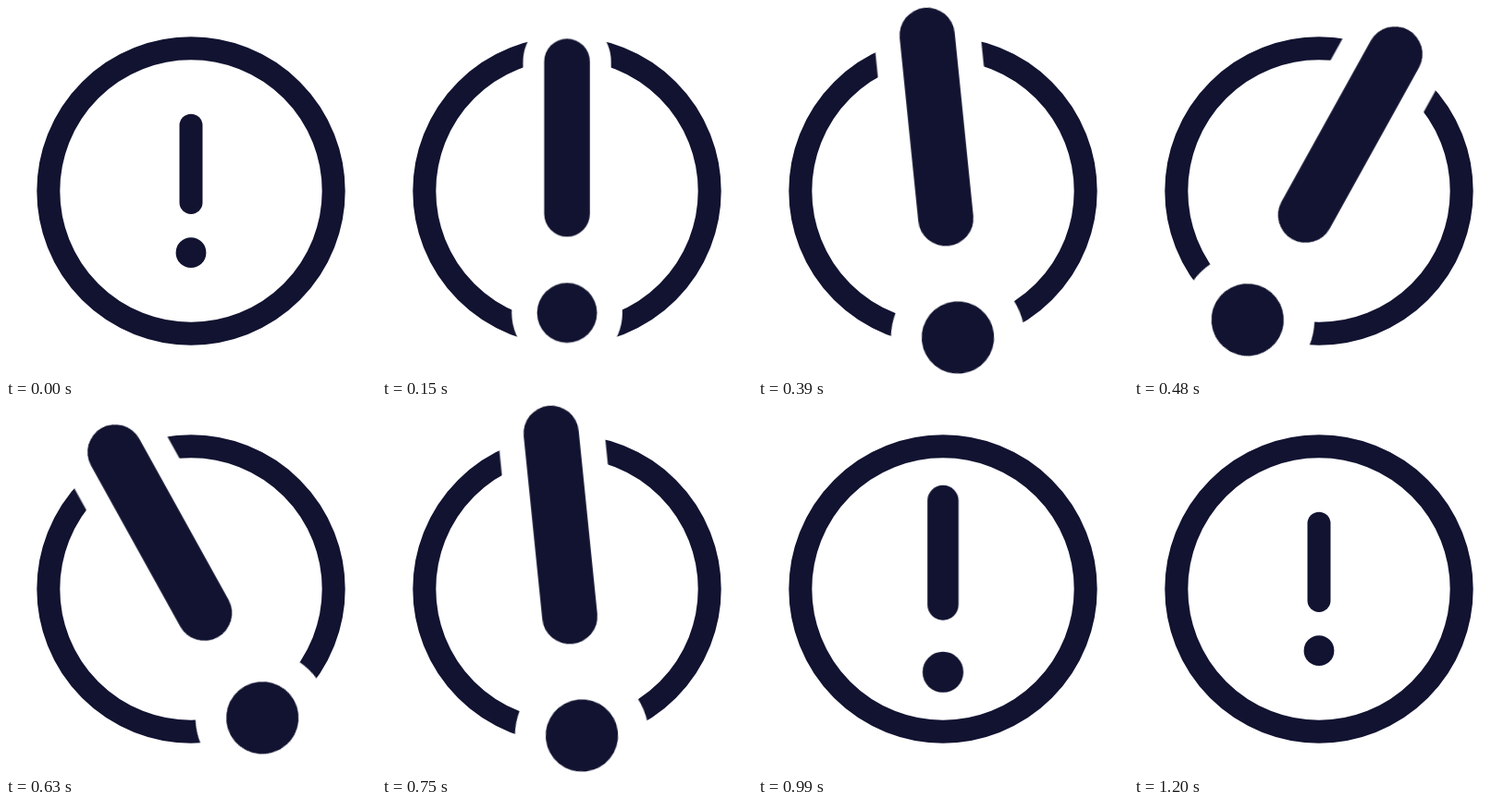
Recreate the animation shown at these times as an HTML page without scripts. Size 400 by 400 pixels, loop 3.23 s.

```html
<!DOCTYPE html>
<html lang="en">
<head>
<meta charset="utf-8">
<title>Alert icon</title>
<style>
  @property --grow { syntax: "<number>"; inherits: false; initial-value: 1; }
  @property --size { syntax: "<number>"; inherits: false; initial-value: 1; }

  html, body { margin: 0; width: 100%; height: 100%; overflow: hidden; background: #fff; }
  svg { display: block; width: 100vw; height: 100vh; }

  .ring { fill: none; stroke: #121331; stroke-width: 25; }
  .bar { stroke: #121331; stroke-width: 25; stroke-linecap: round; }
  .dot { fill: #121331; }
  .halo .bar { stroke: #fff; stroke-width: 48.2; }
  .halo .dot { fill: #fff; }

  /* --grow: what is left of the zoom in; --size: what is left of the zoom out */
  .mark {
    transform-origin: 0 0;
    transform: scale(calc(1 + 1.388 * (1 - var(--grow) * var(--grow)) * var(--size) * var(--size)));
    animation: grow 3230ms -2ms infinite, shrink 3230ms -2ms infinite;
  }
  .swing { transform-origin: 0 0; animation: swing 3230ms -2ms infinite; }

  @keyframes grow {
    0% { --grow: 1; animation-timing-function: steps(11); }
    10.2167%, 100% { --grow: 0; }
  }
  @keyframes shrink {
    0% { --size: 1; }
    24.1486% { --size: 1; animation-timing-function: steps(14); }
    37.1517%, 100% { --size: 0; }
  }
  @keyframes swing {
    0% { transform: rotate(0deg); }
    8.3591% { transform: rotate(0deg); animation-timing-function: steps(2); }
    10.2167% { transform: rotate(-29deg); animation-timing-function: steps(5); }
    14.8607% { transform: rotate(29deg); animation-timing-function: steps(5); }
    19.5046% { transform: rotate(-29deg); animation-timing-function: steps(5); }
    24.1486%, 100% { transform: rotate(0deg); }
  }
</style>
</head>
<body>
<svg viewBox="-200 -200 400 400">
  <defs>
    <path id="bar" d="M0-70.83V12.5"/>
    <circle id="dot" cy="66.67" r="16.4"/>
  </defs>
  <circle class="ring" r="154.17"/>
  <g class="mark">
    <g class="swing">
      <g class="halo">
        <use class="bar" href="#bar"/>
        <circle class="dot" cy="66.67" r="30.3"/>
      </g>
      <use class="bar" href="#bar"/>
      <use class="dot" href="#dot"/>
    </g>
  </g>
</svg>
</body>
</html>
```
